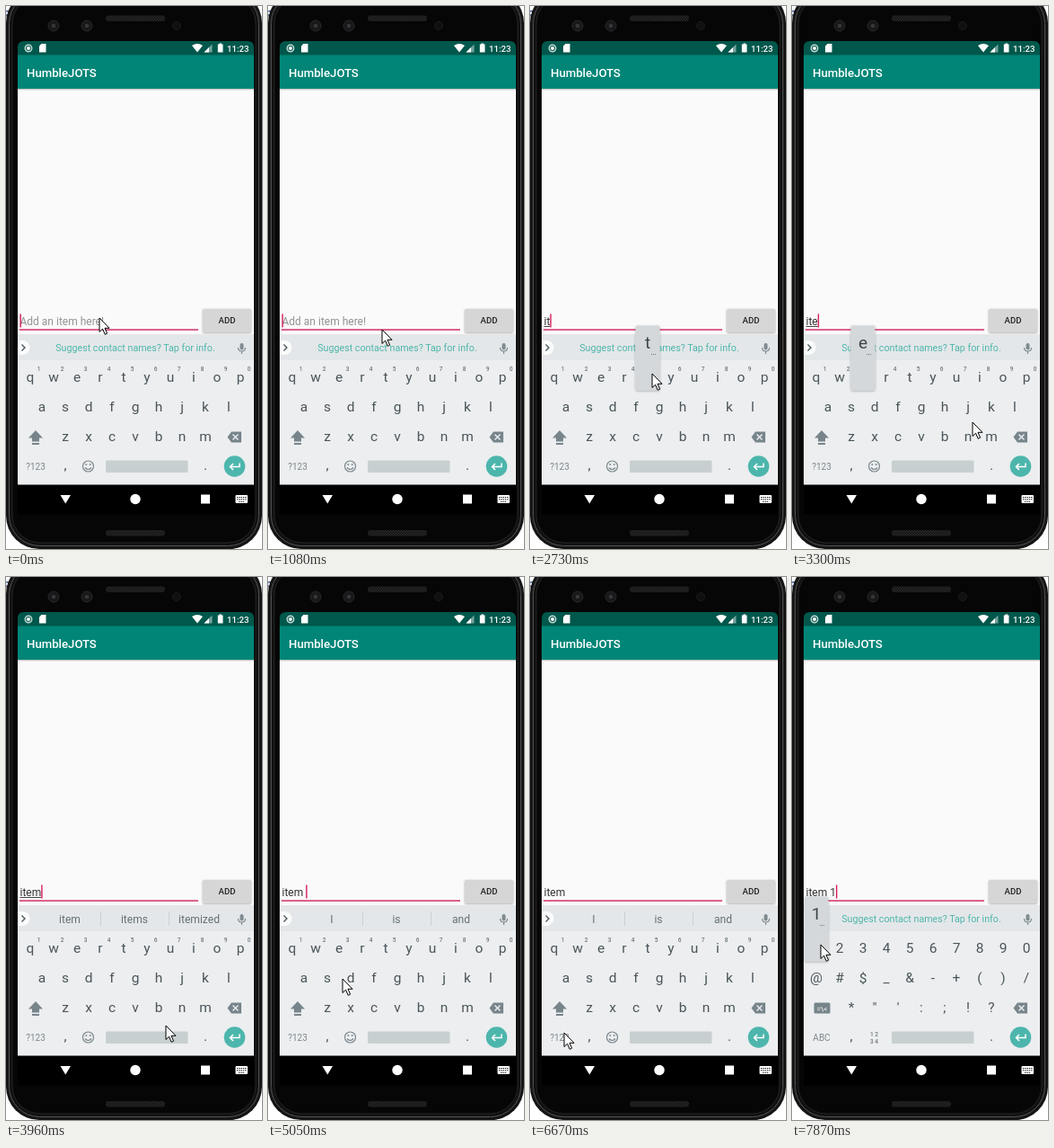
Write an HTML page that moves like this. It is 285x604 px and loops after 7990 ms.

```html
<!DOCTYPE html>
<html lang="en">
<head>
<meta charset="utf-8">
<title>To-do entry</title>
<style>
  html, body { margin: 0; width: 100%; height: 100%; overflow: hidden; background: #fff; }
  svg { display: block; width: 285px; height: 604px; }
  text { font-family: Roboto, "Noto Sans", sans-serif; white-space: pre; }
  .mid { text-anchor: middle; }
  .key { font-size: 15.5px; fill: #4b5559; }
  .small { font-size: 10px; fill: #7d878b; }
  .sup { font-size: 6.5px; font-weight: 500; fill: #6c777c; }
  .word { font-size: 12.1px; fill: #657176; }
</style>
</head>
<body>
<svg viewBox="0 0 285 604" xmlns="http://www.w3.org/2000/svg">
  <defs>
    <pattern id="mesh" width="3" height="3" patternUnits="userSpaceOnUse">
      <rect width="3" height="3" fill="#161616"/>
      <path d="M0 3L3 0" stroke="#333" stroke-width=".8"/>
    </pattern>
    <linearGradient id="shade" x2="0" y2="1">
      <stop stop-color="#000" stop-opacity=".28"/>
      <stop offset="1" stop-color="#000" stop-opacity="0"/>
    </linearGradient>
    <filter id="soft" x="-30%" y="-30%" width="160%" height="160%">
      <feDropShadow dx="0" dy=".7" stdDeviation=".9" flood-opacity=".35"/>
    </filter>
  </defs>

  <rect width="285" height="604" fill="#fff"/>
  <text x="-2" y="11" font-size="11" font-weight="700" fill="#1d3f7c">p</text>
  <rect y="-18" width="285" height="622" rx="37" fill="#151515"/>
  <rect x="3.500" y="-14.500" width="278" height="615" rx="34" fill="#111" stroke="#555"/>
  <rect x="7" y="-11" width="271" height="608" rx="31" fill="#060606" stroke="#242424"/>
  <rect x="111" y="10.500" width="66" height="6.500" rx="3" fill="url(#mesh)"/>
  <rect x="111" y="583" width="66" height="6.500" rx="3" fill="url(#mesh)"/>
  <g fill="#181818" stroke="#292929">
    <circle cx="53" cy="22" r="6"/><circle cx="90" cy="22" r="6"/>
    <circle cx="190" cy="22" r="4.500" fill="#101010" stroke="#1b1b1b"/>
  </g>
  <g fill="#34383c"><circle cx="53" cy="22" r="2.300"/><circle cx="90" cy="22" r="2.300"/></g>

  <rect x="13" y="54" width="263" height="511" fill="#fafafa"/>
  <rect x="13" y="92" width="263" height="2" fill="url(#shade)"/>
  <rect x="13" y="54" width="263" height="38" fill="#008577"/>
  <path d="M13 54.500V46Q13 39 20 39H269Q276 39 276 46V54.500Z" fill="#00574b"/>
  <text x="23" y="78.500" font-size="13.200" font-weight="500" fill="#fff">HumbleJOTS</text>
  <g fill="#fff">
    <circle cx="25" cy="47" r="3.700" fill="none" stroke="#c4dad6" stroke-width="1.500"/>
    <circle cx="25" cy="47" r="2"/>
    <path d="M39.500 42H44.500V51.500H37V44.500Z"/>
    <path d="M207 44Q213 39.800 219 44L213 51.500Z"/>
    <path d="M229.500 42.500V51.500H220.500Z" opacity=".45"/>
    <path d="M226 46V51.500H220.500Z"/>
    <path d="M237.500 41.500H240V42.500H241.500V51.500H235.800V42.500H237.500Z"/>
    <text x="246" y="50.500" font-size="9.600" font-weight="500">11:23</text>
  </g>

  <text id="hint" x="15.500" y="355" font-size="12" fill="#939393">Add an item here!</text>
  <text id="entry" x="15.500" y="355" font-size="12" fill="#333"></text>
  <path id="compose" stroke="#333" stroke-width=".9"/>
  <rect x="15" y="359.300" width="199" height="1.700" fill="#d5487a"/>
  <rect id="caret" y="342.500" width="1.400" height="15" fill="#d81b60"/>
  <rect x="219" y="337" width="54" height="26" rx="1.500" fill="#d6d6d6" filter="url(#soft)"/>
  <text class="mid" x="246" y="353.300" font-size="9.600" font-weight="500" fill="#222">ADD</text>

  <rect x="13" y="365" width="263" height="168" fill="#eceef0"/>
  <rect x="13" y="365" width="263" height="29" fill="#e4e7e9"/>
  <path d="M13 372H18.500A8 8 0 0 1 18.500 388H13Z" fill="#fafbfb"/>
  <path d="M17.500 376.500L21 380L17.500 383.500" fill="none" stroke="#4c585d" stroke-width="1.400"/>
  <g fill="none" stroke="#7f8b90">
    <path d="M262.500 377V380.500" stroke-width="4" stroke-linecap="round"/>
    <path d="M258.500 380Q258.500 384 262.500 384T266.500 380M262.500 384V387" stroke-width="1.200"/>
  </g>
  <text id="notice" class="mid" x="144" y="384.300" font-size="10.700" fill="#4db6ac">Suggest contact names? Tap for info.</text>
  <g id="words"><path d="M105.500 372V388M181.500 372V388" stroke="#cbd1d4"/></g>

  <g id="letters">
    <path d="M33 472L41 480.500H37V484.500H29V480.500H25Z" fill="#77858b"/>
    <rect x="29" y="486" width="8" height="2" fill="#77858b"/>
    <g fill="none" stroke="#7d898e" stroke-width="1.200">
      <circle cx="91.500" cy="512" r="6"/><path d="M88 513.500Q91.500 517.500 95 513.500"/>
    </g>
    <circle cx="89.300" cy="510" r="1" fill="#7d898e"/><circle cx="93.700" cy="510" r="1" fill="#7d898e"/>
  </g>
  <g id="symbols">
    <rect x="24.500" y="473.500" width="18" height="12" rx="1.500" fill="#77858b"/>
    <text class="mid" x="33.500" y="482.500" font-size="8" font-weight="500" fill="#eceff1">=\&lt;</text>
  </g>
  <path d="M251 473.500H262V485.500H251L246.500 479.500Z" fill="#77858b"/>
  <path d="M252.500 476.500L258.500 482.500M258.500 476.500L252.500 482.500" stroke="#eceff1" stroke-width="1.400"/>
  <rect x="111" y="505.500" width="91.500" height="13.500" rx="1.500" fill="#c8cfd1"/>
  <circle cx="254.500" cy="512" r="11.800" fill="#4db6ac"/>
  <path d="M260 508.500V512.500H249.500M253 509L249.500 512.500L253 516" fill="none" stroke="#fff" stroke-width="1.500"/>
  <g id="common"></g>

  <rect x="13" y="532.500" width="263" height="33" fill="#000"/>
  <g fill="#fff">
    <path d="M60.500 544H72L66.250 553.500Z"/>
    <circle cx="144" cy="548.500" r="5.700"/>
    <rect x="217" y="543.500" width="10" height="10"/>
    <rect x="255.500" y="544" width="13.500" height="9" rx="1"/>
    <path d="M257 546.500H268M257 548.700H268M259 551.300H266" stroke="#000" stroke-width="1.100" stroke-dasharray="1.300 1"/>
  </g>

  <g id="popup">
    <rect width="27" height="72" rx="2" fill="#d4d8da" filter="url(#soft)"/>
    <text id="popKey" class="mid" x="13.500" y="25" font-size="19" fill="#3d464a"></text>
    <text class="mid" x="20" y="32" font-size="9" fill="#4d585d">…</text>
  </g>
  <path id="mouse" d="M0 0V15.500L3.600 12.200L6.200 18.300L8.600 17.200L6 11.300H11Z" fill="#fff" stroke="#000"/>
</svg>
<script>
const LOOP = 7990, BLINK = 500, POPUP_TIME = 230, COMMIT_DELAY = 500;
const KEY_GAP = 26;
const $ = id => document.getElementById(id);
const show = (id, on) => $(id).setAttribute('visibility', on ? 'visible' : 'hidden');

function label(parent, x, y, cls, str) {
  const el = document.createElementNS('http://www.w3.org/2000/svg', 'text');
  el.setAttribute('x', x);
  el.setAttribute('y', y);
  el.setAttribute('class', 'mid ' + cls);
  el.textContent = str;
  $(parent).appendChild(el);
  return el;
}

const keyAt = { hint: [99, 352], space: [156, 512] };
function addKey(parent, x, y, cls, str) {
  label(parent, x, y + 4.5, cls, str);
  keyAt[str] = [x, y];
}

function addKeyboard(id, rows, modeKey) {
  rows.forEach((keys, r) => {
    const x = 144 - (keys.length - 1) * KEY_GAP / 2;
    [...keys].forEach((key, i) => addKey(id, x + i * KEY_GAP, 413.5 + r * 33.2, 'key', key));
  });
  addKey(id, 33, 511.5, 'small', modeKey);
}

const DIGITS = '1234567890';
addKeyboard('letters', ['qwertyuiop', 'asdfghjkl', 'zxcvbnm'], '?123');
addKeyboard('symbols', [DIGITS, '@#$_&-+()/', '*"\':;!?'], 'ABC');
[...DIGITS].forEach((n, i) => label('letters', 36.5 + i * KEY_GAP, 406, 'sup', n));
label('symbols', 91.5, 511, 'sup', '1 2');
label('symbols', 91.5, 518.5, 'sup', '3 4');
label('common', 66, 516, 'key', ',');
label('common', 222, 516, 'key', '.');
const words = [71, 143, 215].map(x => label('words', x, 384.5, 'word', ''));

// The pointer glides to each key from go to arrive; the phone reacts at tap.
const moves = [
  { key: 'i', go: 950, arrive: 1400, tap: 1550 },
  { key: 't', go: 2060, arrive: 2500, tap: 2680 },
  { key: 'e', go: 2720, arrive: 2950, tap: 3300 },
  { key: 'm', go: 2960, arrive: 3430, tap: 3600 },
  { key: 'space', go: 3700, arrive: 4090, tap: 4380 },
  { key: 'q', go: 4720, arrive: 5300 },
  { key: '?123', go: 6200, arrive: 6650, tap: 7200 },
  { key: '1', go: 7200, arrive: 7650, tap: 7760 },
];
const [space, mode] = ['space', '?123'].map(key => moves.find(m => m.key === key));
const commitTime = space.tap + COMMIT_DELAY;
const typing = moves.filter(m => m.tap && m !== mode);
const blinkStarts = [0, ...typing.map(m => m.tap), commitTime];

const ease = u => u * u * (3 - 2 * u);

function pointerAt(t) {
  let [x, y] = keyAt.hint;
  for (const { key, go, arrive } of moves) {
    const k = ease(Math.min(1, Math.max(0, (t - go) / (arrive - go))));
    x += (keyAt[key][0] - x) * k;
    y += (keyAt[key][1] - y) * k;
  }
  return [Math.round(x + 5), Math.round(y - 5)];
}

function suggestions(t, text) {
  if (t >= mode.tap || !text.startsWith('item')) return [];
  return t < commitTime ? ['item', 'items', 'itemized'] : ['I', 'is', 'and'];
}

function draw(t) {
  const entered = typing.filter(m => m.tap <= t);
  const text = entered.map(m => m.key === 'space' ? ' ' : m.key).join('');
  $('entry').textContent = text;
  show('hint', !text);

  const end = 15.5 + (text ? $('entry').getComputedTextLength() : 0);
  const blinkStart = Math.max(...blinkStarts.filter(s => s <= t));
  $('compose').setAttribute('d', `M15.5 356.5H${end}`);
  show('compose', text && t < commitTime);
  $('caret').setAttribute('x', end);
  show('caret', Math.floor((t - blinkStart) / BLINK) % 2 === 0);

  const picks = suggestions(t, text);
  show('notice', !picks.length);
  show('words', picks.length);
  words.forEach((el, i) => el.textContent = picks[i] || '');

  show('letters', t < mode.tap);
  show('symbols', t >= mode.tap);

  const last = entered[entered.length - 1];
  const pressed = last && last !== space && t - last.tap < POPUP_TIME;
  show('popup', pressed);
  if (pressed) {
    const [x, y] = keyAt[last.key];
    $('popup').setAttribute('transform', `translate(${x - 13.5} ${y - 58})`);
    $('popKey').textContent = last.key;
  }
  $('mouse').setAttribute('transform', `translate(${pointerAt(t)})`);
}

const start = performance.now();
function frame() {
  draw((performance.now() - start) % LOOP);
  requestAnimationFrame(frame);
}
frame();
</script>
</body>
</html>
```
